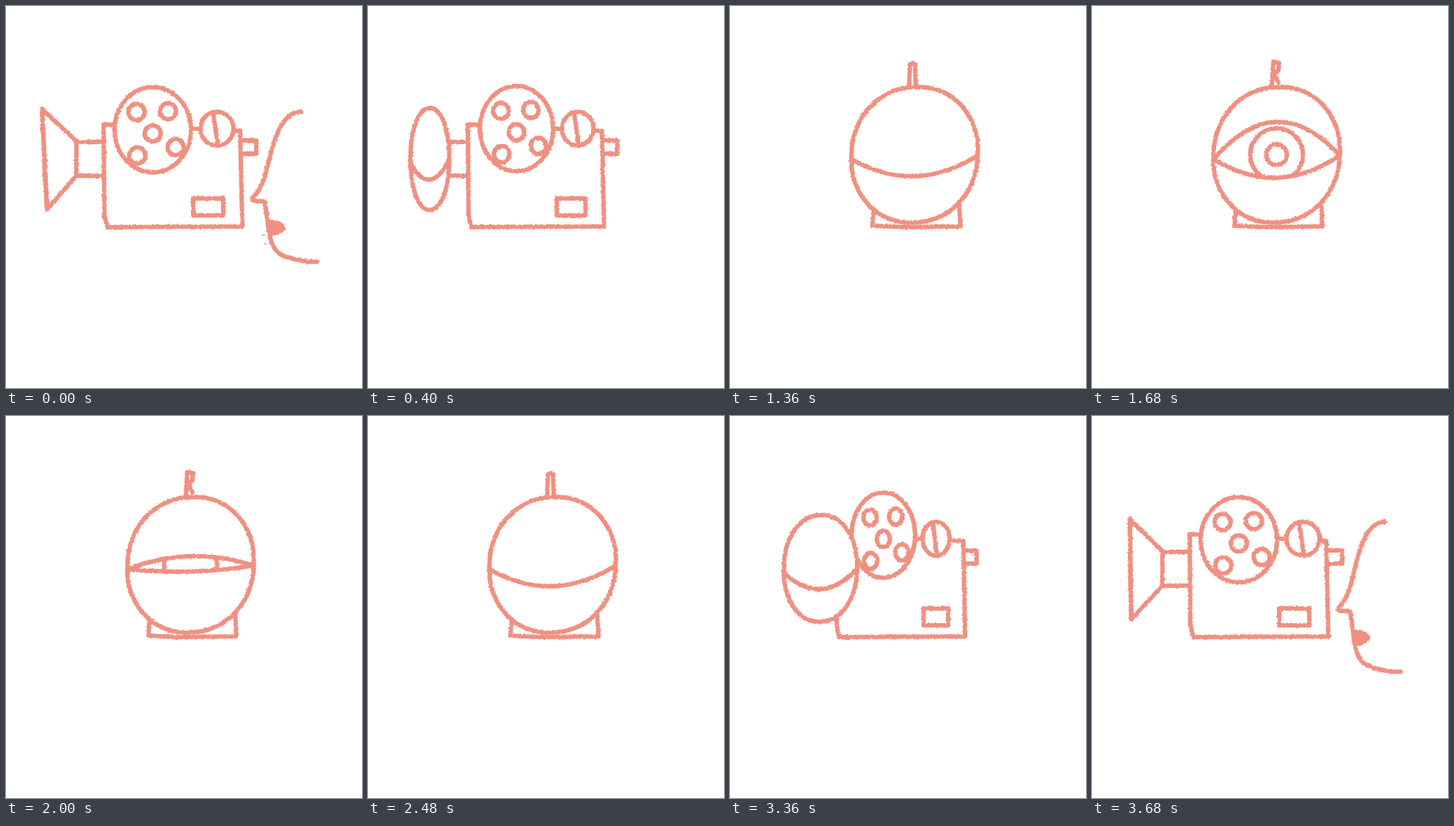
An HTML page that plays this animation: 485x520 px, repeating every 3.84 s.

```html
<!DOCTYPE html>
<html lang="en">
<head>
<meta charset="utf-8">
<title>Camera eye</title>
<style>
  html, body { margin: 0; width: 100%; height: 100%; overflow: hidden; background: #fff; }
  svg { display: block; width: 485px; height: 520px; }
  #art { fill: none; stroke: #f09081; stroke-width: 6; stroke-linecap: round; stroke-linejoin: round; }
  #art path { vector-effect: non-scaling-stroke; }
  #art .solid { fill: #fff; }
  #art .ink { fill: #f09081; stroke-width: 2; }
</style>
</head>
<body>
<svg viewBox="0 0 485 520" xmlns="http://www.w3.org/2000/svg">
  <filter id="chalk" filterUnits="userSpaceOnUse" x="0" y="0" width="485" height="520" color-interpolation-filters="sRGB">
    <feTurbulence id="grain" type="fractalNoise" baseFrequency="0.33" numOctaves="2"/>
    <feDisplacementMap in="SourceGraphic" scale="3.4" xChannelSelector="R" yChannelSelector="G"/>
  </filter>
  <g filter="url(#chalk)"><g id="art"></g></g>
</svg>
<script>
const STEP = 80, STEPS = 48, HALF = STEPS / 2;
const FRONT = 10, BLINK = 7;
const EYE = { x: 251.5, y: 202.5, rx: 86, ry: 92 };
const HOLE_ANGLES = [30, 126, 232, 305];

const $ = id => document.getElementById(id);
const mix = (a, b, t) => a + (b - a) * t;
const path = (d, cls = '') => `<path class="${cls}" d="${d}"/>`;
const oval = (x, y, rx, ry, cls = '') => `<ellipse class="${cls}" cx="${x}" cy="${y}" rx="${rx}" ry="${ry}"/>`;

// A hand-drawn round, a little fuller at the upper right.
function ball({ x, y, rx, ry }, lean = 0) {
  const rim = Array.from({ length: 60 }, (_, i) => {
    const a = i * Math.PI / 30, c = Math.cos(a), s = Math.sin(a);
    const r = 1 + .08 * Math.max(0, -c * s);
    return [x + rx * r * c + lean * s, y + ry * r * s];
  });
  return path(`M${rim.join('L')}Z`, 'solid');
}

const lidCurve = ({ x, y, rx }, bulge) =>
  `M${x - rx},${y + 6}Q${x},${y + 3 + 2 * bulge} ${x + rx},${y + 1}`;

function face(sx, sy) {
  return `<g transform="translate(335 263) scale(${sx} ${sy}) translate(-335 -263)">` +
    path('M402,144C376,144 366,180 359,207C353,234 347,251 336,261Q334,265 338,265L352,266' +
      'C358,290 355,322 371,336Q382,344 412,348L424,348') +
    path('M357,292C370,291 379,297 380,302Q376,311 360,312Z', 'ink') + '</g>';
}

// The camera at any turn, from its side (0) to its lens (90 degrees).
function camera(angle, lean) {
  const c = Math.cos(angle), s = Math.sin(angle), k = 1 - c;
  const left = mix(133, 195, k), right = mix(321, 313, k), neck = mix(96, 251, k);
  const reelX = mix(200, 248, k), reelY = mix(168.5, 135, k);
  const knobX = mix(287.5, 251, k), labelX = mix(275.5, 302, k), labelW = 20.5 * c;
  const rx = EYE.rx * s;
  const rim = { x: mix(52.5, 165, k) + rx, y: mix(208.5, EYE.y, k), rx, ry: mix(68, EYE.ry, k) };
  const holes = [[200, 173.5], ...HOLE_ANGLES.map(deg => {
    const a = deg * Math.PI / 180;
    return [200 + 36 * Math.cos(a), 173.5 + 37 * Math.sin(a)];
  })];
  return path(`M${left},161L${left + 1},285L${left + 5 * c},301L${right + c},300L${right - 2 * c},170Z`) +
    path(`M${right},183h${20 * c}v18h${-20 * c}`) +
    oval(knobX, 167, 22.5 * c, 23, 'solid') + path(`M${knobX - 5 * c},147L${knobX + c},188`) +
    oval(reelX, reelY, mix(5, 52, c), 58, 'solid') +
    holes.map(([x, y]) => oval(reelX + (x - 200) * c, reelY + y - 168.5, 11 * c, 11)).join('') +
    path(`M${labelX - labelW},262h${2 * labelW}v23h${-2 * labelW}Z`) +
    path(`M${left},185H${neck}V231H${left}`) +
    path(`M${neck},184L${rim.x - lean},${rim.y - rim.ry}L${rim.x + lean},${rim.y + rim.ry}L${neck},231`) +
    ball(rim, lean * c) + path(lidCurve(rim, 25));
}

const foot = right => path(`M196,276L194,299L235,301L${right},300L${right - 2},268`);

function shutEye(right) {
  return path('M244,109L245,83Q246,76 252,79L253,109') + foot(right) + ball(EYE) + path(lidCurve(EYE, 26));
}

function openEye(open) {
  const up = mix(15, 48, open), down = mix(6, 28, open);
  const lids = lidCurve(EYE, -up) + `Q${EYE.x},${EYE.y + 3 + 2 * down} ${EYE.x - EYE.rx},${EYE.y + 6}Z`;
  return path('M245,109L247,76L255,78L254,88L248,92L254,104') + foot(314) + ball(EYE) +
    `<clipPath id="lids">${path(lids)}</clipPath><g clip-path="url(#lids)">` +
    oval(EYE.x, EYE.y, 36, 36) + (open ? oval(EYE.x, EYE.y, 14, 14) : '') + '</g>' + path(lids);
}

function drawing(pose) {
  if (pose < FRONT) {
    const u = Math.max(0, (pose - 3) / BLINK);
    const away = Math.max(0, pose - 2);
    const view = camera(Math.PI / 2 * u * u * (3 - 2 * u), pose ? 1 : 3.5);
    if (pose === 0) return view + face(1, 1) + path('M351,312h.1M353,324h.1', 'ink');
    return away < 3 ? view + face(.96 - .36 * away, 1 - .1 * away) : view;
  }
  const phase = (pose - FRONT) % BLINK;
  if (phase === 0) return shutEye(pose === FRONT ? 302 : 314);
  return openEye((Math.min(phase, BLINK - phase) - 1) / 2);
}

let shown = -1;
function render(time) {
  const step = Math.floor(time / STEP) % STEPS;
  // The second half of the loop plays the first half backwards.
  let pose = HALF - Math.abs(HALF - step);
  if (pose === 2) pose = 1;
  if (pose === shown) return;
  shown = pose;
  $('grain').setAttribute('seed', pose + 1);
  $('art').innerHTML = drawing(pose);
}

const start = performance.now();
function tick() {
  render(performance.now() - start);
  requestAnimationFrame(tick);
}
tick();
</script>
</body>
</html>
```
